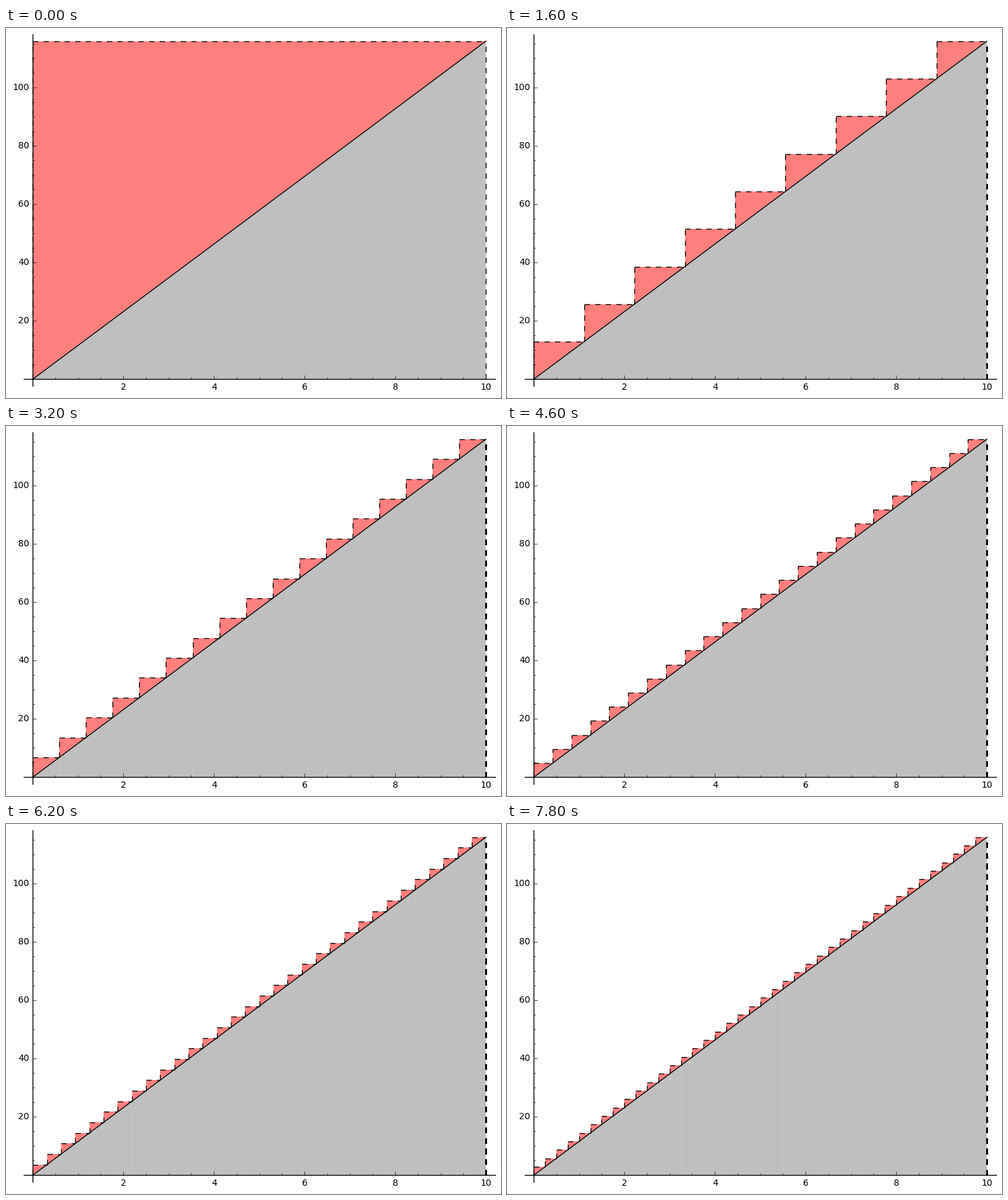
Animation, 781 px wide and 584 px high, one loop 8 s. Source, as a matplotlib script:

```python
import matplotlib.pyplot as plt
from matplotlib.animation import FuncAnimation
from matplotlib.ticker import MultipleLocator

W, H, DPI = 781, 584, 100
X_MAX, Y_MAX = 10, 116
X0, Y0 = 42.2, 29.615    # pixel position of the data origin, from bottom left
SX, SY = 71.5, 4.6       # pixels per data unit
PAD = 0.02               # margin around the data, as a share of its range
DASH = dict(color="black", lw=1, ls=(0, (6, 6)))

fig = plt.figure(figsize=(W / DPI, H / DPI), dpi=DPI, facecolor="white")
px, py = PAD * X_MAX, PAD * Y_MAX
ax = fig.add_axes([
    (X0 - px * SX) / W,
    (Y0 - py * SY) / H,
    (X_MAX + 2 * px) * SX / W,
    (Y_MAX + 2 * py) * SY / H,
])


def setup_axes():
    ax.set_xlim(-px, X_MAX + px)
    ax.set_ylim(-py, Y_MAX + py)
    ax.patch.set_visible(False)
    for side in ("top", "right"):
        ax.spines[side].set_visible(False)
    for side in ("left", "bottom"):
        ax.spines[side].set_position("zero")
        ax.spines[side].set_linewidth(1)
    ax.xaxis.set_minor_locator(MultipleLocator(0.5))
    ax.yaxis.set_minor_locator(MultipleLocator(5))
    ax.set_xticks(range(2, X_MAX + 1, 2))
    ax.set_yticks(range(20, 101, 20))
    ax.tick_params(which="major", direction="in", length=4, width=0.5,
                   pad=4, labelsize=10, labelfontfamily="DejaVu Sans")
    ax.tick_params(which="minor", direction="in", length=2, width=0.5)
    plt.setp(ax.get_yticklabels(), va="center")


def area(points, color):
    xs, ys = zip(*points)
    return ax.fill(xs, ys, color=color, alpha=0.5, lw=0)


def dashed(x0, y0, x1, y1):
    return ax.plot([x0, x1], [y0, y1], **DASH)


setup_axes()
ax.plot([0, X_MAX], [0, Y_MAX], color="black", lw=1)
artists = []


def reset():
    while artists:
        artists.pop().remove()
    return []


def draw(frame):
    reset()
    n = frame + 1
    for i in range(n):
        xa, xb = X_MAX * i / n, X_MAX * (i + 1) / n
        ya, yb = Y_MAX * i / n, Y_MAX * (i + 1) / n
        artists.extend(area([(xa, ya), (xa, yb), (xb, yb)], "red"))
        artists.extend(area([(xa, 0), (xa, ya), (xb, yb), (xb, 0)], "gray"))
        artists.extend(dashed(xa, ya, xa, yb))
        artists.extend(dashed(xa, yb, xb, yb))
        # the right edge is drawn once per step, so it grows heavier
        artists.extend(dashed(X_MAX, 0, X_MAX, Y_MAX))
    return artists


anim = FuncAnimation(fig, draw, frames=40, init_func=reset, interval=200,
                     repeat=True, repeat_delay=0, blit=False)
plt.show()
```
